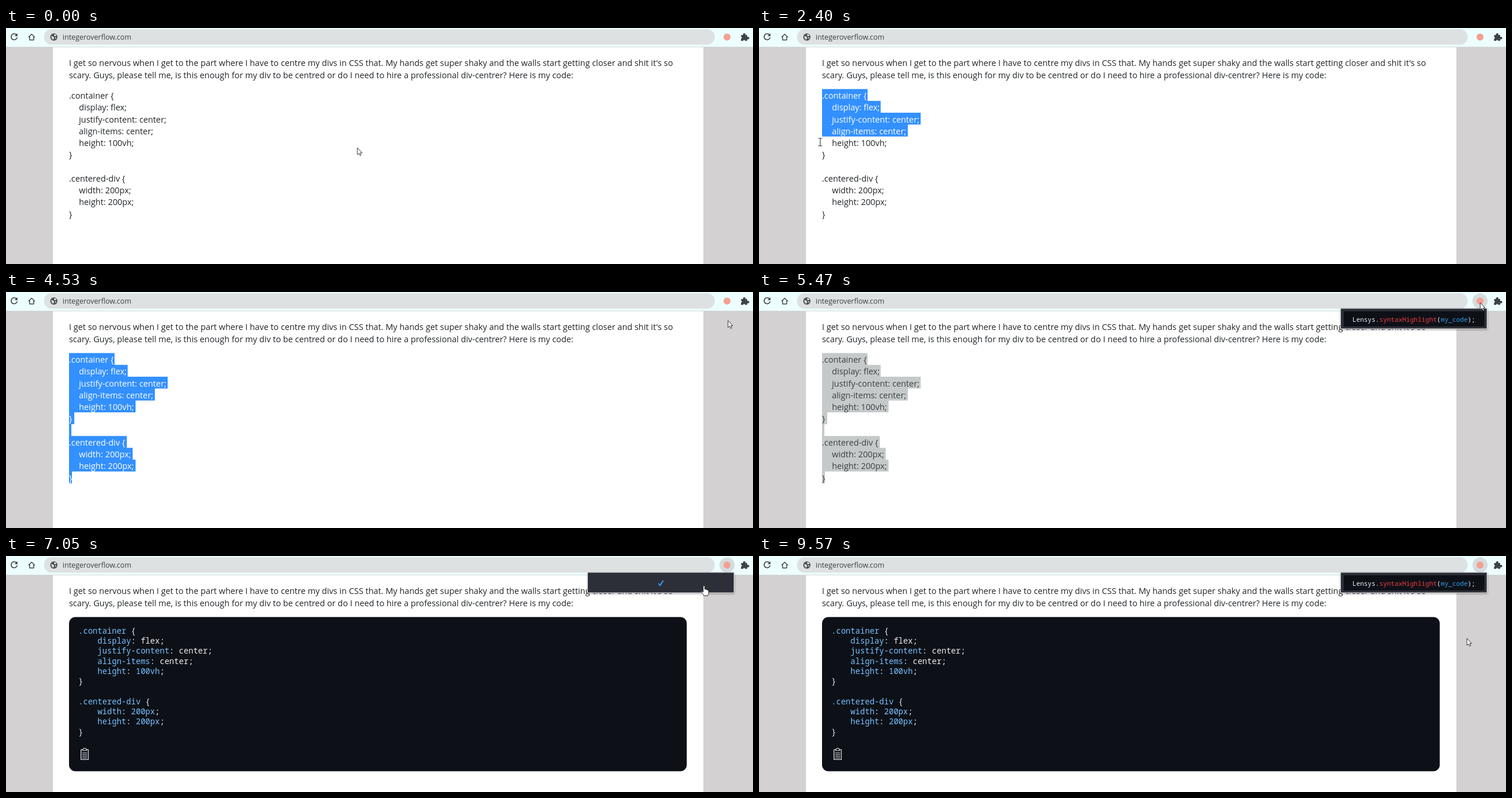
Animation, 1280 px wide and 404 px high, one loop 9.67 s. Source, as an HTML page:

```html
<!DOCTYPE html>
<html lang="en">
<head>
<meta charset="utf-8">
<title>Code highlighter</title>
<style>
  html, body { margin: 0; width: 100%; height: 100%; overflow: hidden; background: #fff; }
  svg { display: block; width: 100vw; height: 100vh; }
  text { font: 14.34px "Open Sans", "Noto Sans", sans-serif; fill: #212529; white-space: pre; }
  #url { font-size: 12.37px; fill: #3c4043; }
  #code text { font: 13.68px "Noto Sans Mono", monospace; fill: #e6edf3; }
  #code .k { fill: #79c0ff; }
  #label { font: 10.97px "Noto Sans Mono", monospace; fill: #f0f3f6; }
  .line { fill: none; stroke-linecap: round; stroke-linejoin: round; }
</style>
</head>
<body>
<svg viewBox="0 0 1280 404">
  <defs>
    <clipPath id="clip"></clipPath>
    <filter id="shadow" x="-5%" y="-20%" width="110%" height="150%">
      <feDropShadow dx="0" dy="1" stdDeviation="1.5" flood-opacity=".45"/>
    </filter>
  </defs>

  <rect width="1280" height="404" fill="#d3d1d2"/>
  <rect x="80.5" y="32" width="1114.5" height="372" fill="#fff"/>
  <rect width="1280" height="32.5" fill="#edfefe"/>
  <path d="M0 32.5H1280" stroke="#d5d9d9"/>
  <rect x="65" y="2" width="1149.5" height="26.5" rx="13.2" fill="#dee1e2"/>

  <g class="line" stroke="#3f4347" stroke-width="1.6">
    <path d="M18 11.6A5.2 5.2 0 1 0 19 16.5"/>
    <path d="M39 15.5L44 10.5L49 15.5M40.5 14.5V20.5H47.5V14.5" stroke-width="1.4"/>
  </g>
  <path d="M19.6 9V14H14.6Z" fill="#3f4347"/>
  <circle cx="82" cy="15.5" r="6.2" fill="#505458"/>
  <path d="M77.5 13.5l4 1.5 1 2.5-2 2.5-2-2zM82 11l3 0 1.500 2-3 1.500zM84 16l2.500 0-1.500 3z" fill="#dee1e2"/>
  <text id="url" x="97" y="20">integeroverflow.com</text>

  <circle id="hoverMenu" cx="1265" cy="15.500" r="13" fill="#d5dfe0"/>
  <circle id="hoverIcon" cx="1235.500" cy="15.500" r="13" fill="#d5dcde"/>
  <circle cx="1235.500" cy="15.500" r="6" fill="#f3a093"/>
  <path d="M1260 12h3a2.200 2.200 0 1 1 4 0h3v3.500a2.200 2.200 0 1 1 0 3.500v3h-3.200a2 2 0 0 0-3.800 0h-3.500v-3.500a2 2 0 0 0 0-3.800z" fill="#3f4347"/>

  <text x="108" y="65.300">I get so nervous when I get to the part where I have to centre my divs in CSS that. My hands get super shaky and the walls start getting closer and shit it's so</text>
  <text x="108" y="85.500">scary. Guys, please tell me, is this enough for my div to be centred or do I need to hire a professional div-centrer? Here is my code:</text>

  <g id="plain"></g>
  <g id="selected" clip-path="url(#clip)">
    <rect id="selFill" x="100" y="100" width="190" height="235"/>
    <g id="selText"></g>
  </g>

  <g id="code">
    <rect x="108" y="104.500" width="1058.500" height="264" rx="11" fill="#0d1117"/>
    <g class="line" stroke="#e6edf3" stroke-width="1.200">
      <path d="M131 331.500H128.500V348.500H141V331.500H138.500M131.500 333V331Q134.700 327 138 331V333ZM131 337H138.500M131 340H138.500M131 343H138.500M131 346H138.500"/>
    </g>
  </g>

  <g id="popup">
    <rect x="996.500" y="28" width="251.500" height="35.500" fill="#e4e6e8" filter="url(#shadow)"/>
    <rect x="997" y="28.500" width="250" height="34" fill="#2d2f38"/>
    <rect id="button" x="1002" y="33" width="241" height="26" fill="#0d1117"/>
    <text id="label" x="1016.800" y="50.500">Lensys.<tspan fill="#f03a49">syntaxHighlight</tspan>(<tspan fill="#2f9fee">my_code</tspan>);</text>
    <path id="check" class="line" d="M1118.500 47.500L1120.800 50.500L1125.800 42.500" stroke="#2f9bff" stroke-width="2"/>
  </g>

  <g id="cursor">
    <path id="arrow" d="M0 0V12L2.800 9.500L4.700 13.500L6.600 12.600L4.800 8.800H8.300Z" fill="#fff" stroke="#222" stroke-width=".9"/>
    <path id="beam" class="line" d="M-3 -6.500H-1Q0 -6.500 0 -5.500Q0 -6.500 1 -6.500H3M0 -5.500V5.500M-3 6.500H-1Q0 6.500 0 5.500Q0 6.500 1 6.500H3" stroke="#333" stroke-width="1.100"/>
    <path id="hand" d="M-1.300 1Q0 -1.500 1.300 1V6Q3 5 3.800 6.700Q5.300 5.900 6 7.500Q7.800 7.200 8 9V12Q8 14 6.800 15.500V17H-.500V15.500L-4 11.500Q-5 9.500-3.500 9.200L-1.300 11Z" fill="#fff" stroke="#222" stroke-width=".9"/>
  </g>
</svg>

<script>
const LOOP = 9670, ROW = 20.27, TOP = 104.5;
const $ = id => document.getElementById(id);
const lines = [
  ".container {", "    display: flex;", "    justify-content: center;",
  "    align-items: center;", "    height: 100vh;", "}", "",
  ".centered-div {", "    width: 200px;", "    height: 200px;", "}"
];
const selWidths = [78, 100.5, 169, 147, 114, 9, 4, 99, 109, 114, 5];

// Pointer hot spot: time, x, y
const path = [
  [0, 602, 205], [90, 602, 205], [350, 450, 192], [600, 310, 168], [800, 180, 130],
  [900, 111, 113], [1040, 112, 127], [1690, 110, 119.5], [2020, 110, 119.5],
  [2400, 105, 195], [2750, 112, 285], [2960, 141, 319], [3130, 141, 319],
  [3195, 330, 290], [3260, 526, 234], [3450, 680, 226], [3700, 850, 212],
  [3900, 1030, 182], [4080, 1164, 120], [4300, 1208, 80], [4530, 1237, 49],
  [4730, 1262, 20], [5040, 1239, 11], [5550, 1236, 19], [5760, 1236, 19],
  [6210, 1213, 36], [6680, 1196, 51], [9250, 1196, 51], [9400, 1216, 95],
  [9570, 1213, 141], [LOOP, 1213, 141]
];

const ramp = (t, a, b) => Math.min(1, Math.max(0, (t - a) / (b - a)));
const within = (t, a, b) => t >= a && t < b;
const show = (id, on) => $(id).setAttribute("opacity", +on);

function svg(tag, attrs, parent) {
  const el = document.createElementNS("http://www.w3.org/2000/svg", tag);
  for (const k in attrs) el.setAttribute(k, attrs[k]);
  return parent.appendChild(el);
}

const selRows = lines.map((line, i) => {
  const spot = { x: line[0] === " " ? 125 : 108, y: 121 + i * ROW };
  for (const id of ["plain", "selText"]) svg("text", spot, $(id)).textContent = line.trim();
  svg("text", { x: 124, y: 132.7 + i * 17.3 }, $("code")).innerHTML =
    line.replace(/\.[\w-]+|[\w-]+(?=:)|\d+\w+/g, '<tspan class="k">$&</tspan>');
  return svg("rect", { x: 108, y: TOP + i * ROW, height: ROW + .05 }, $("clip"));
});

function slope(i, axis) {
  const a = path[i - 1], p = path[i], b = path[i + 1];
  const still = q => q[1] === p[1] && q[2] === p[2];
  if (!a || !b || still(a) || still(b)) return 0;
  return (b[axis] - a[axis]) / (b[0] - a[0]);
}

function pointer(t) {
  const i = Math.max(0, path.findIndex(p => p[0] > t) - 1);
  const a = path[i], b = path[i + 1], d = b[0] - a[0], u = (t - a[0]) / d;
  const s = u * u * (3 - 2 * u);
  return [1, 2].map(k => a[k] + (b[k] - a[k]) * s +
    d * u * (1 - u) * ((1 - u) * slope(i, k) - u * slope(i + 1, k)));
}

function select(t, x, y) {
  const row = t < 2020 ? -1 : t < 2960 ? Math.floor((y - TOP) / ROW) : lines.length;
  selRows.forEach((rect, i) => {
    const w = i < row ? selWidths[i] : i === row ? Math.min(selWidths[i], Math.max(0, x - 108)) : 0;
    rect.setAttribute("width", w);
  });
  const active = t < 5180;
  $("selFill").setAttribute("fill", active ? "#3390ff" : "#c5c9c9");
  for (const el of $("selText").children) el.style.fill = active ? "#fff" : "#3b4044";
}

function draw(t) {
  const [x, y] = pointer(t);
  select(t, x, y);

  const done = t >= 6860;
  show("plain", !done);
  show("selected", !done);
  show("code", done);

  show("hoverMenu", ramp(t, 4620, 4700) - ramp(t, 4880, 4960));
  show("hoverIcon", ramp(t, 4930, 5020));
  show("popup", t >= 5180);
  show("button", 1 - ramp(t, 6230, 6420) + ramp(t, 9310, 9500));
  show("label", 1 - ramp(t, 6760, 6900) + ramp(t, 8780, 8950));
  show("check", ramp(t, 6900, 7040) - ramp(t, 8780, 8900));

  const beam = within(t, 700, 3170), hand = within(t, 6230, 9300);
  show("beam", beam);
  show("hand", hand);
  show("arrow", !beam && !hand);
  $("cursor").setAttribute("transform", `translate(${x} ${y})`);
}

const start = performance.now();
function tick() {
  draw((performance.now() - start) % LOOP);
  requestAnimationFrame(tick);
}
tick();
</script>
</body>
</html>
```
